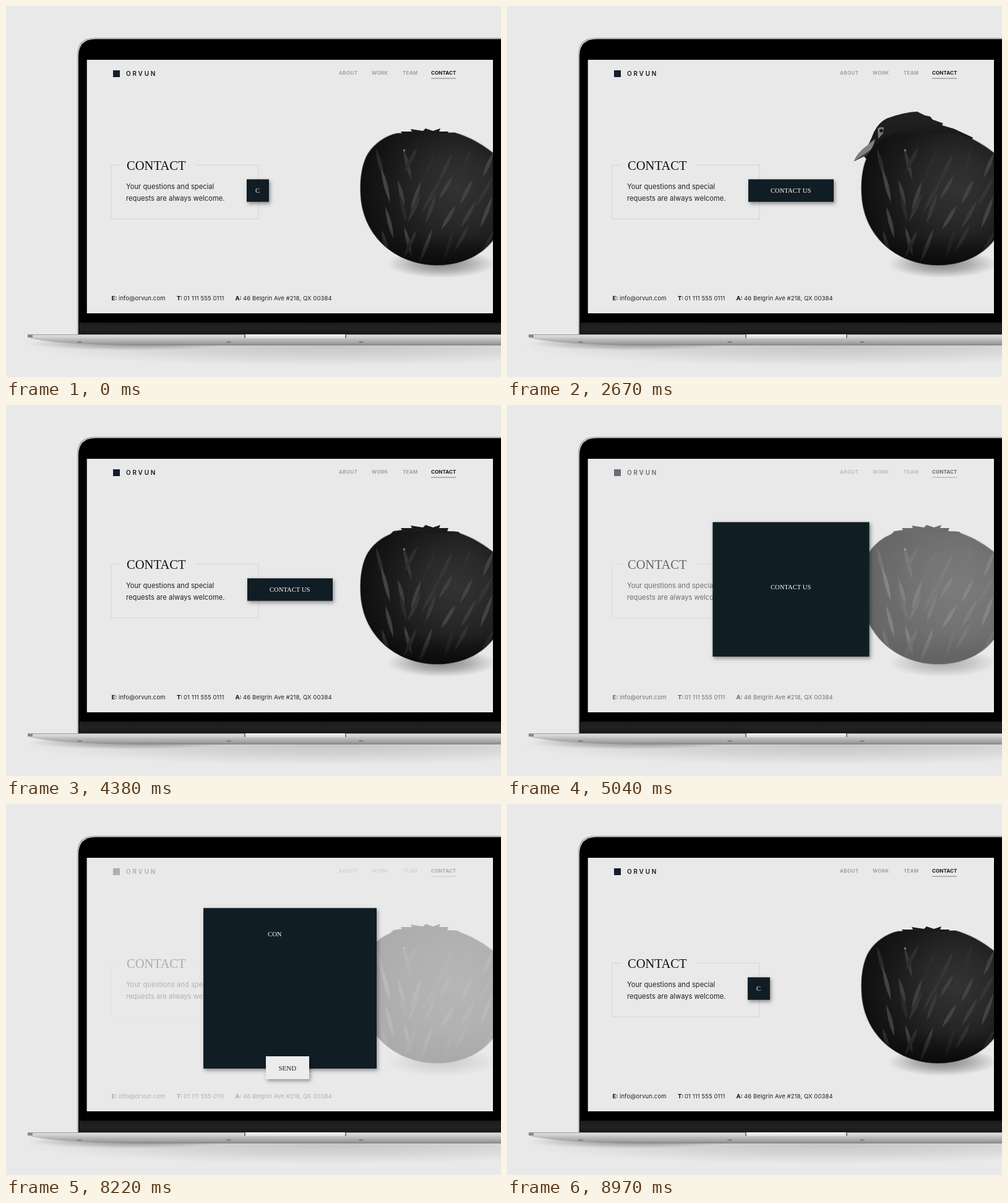
These frames come from a looping animation (800x600 px, 9000 ms). An HTML page with a canvas:

```html
<!DOCTYPE html>
<html lang="en">
<head>
<meta charset="utf-8">
<title>Contact form</title>
<style>
html, body { margin: 0; width: 100%; height: 100%; overflow: hidden; background: #e9e9e9; }
canvas { display: block; }
</style>
</head>
<body>
<canvas id="stage" width="800" height="600"></canvas>
<script>
const ctx = document.getElementById('stage').getContext('2d');
const LOOP = 9000;
const PAPER = '#e9e9e9', NAVY = '#111d24', INK = '#15181d';
const SANS = 'Inter, Arial, sans-serif';
const SERIF = '"Liberation Serif", "Times New Roman", serif';
const SCREEN = [130.5, 87, 656.5, 410];

const seg = (t, a, b) => Math.min(1, Math.max(0, (t - a) / (b - a)));
const mix = (a, b, k) => a + (b - a) * k;
const outCubic = p => 1 - (1 - p) ** 3;
const inOut = (p, n) => p < .5 ? (2 * p) ** n / 2 : 1 - (2 - 2 * p) ** n / 2;

function keyed(t, keys) {
  let i = 1;
  while (i < keys.length - 1 && t > keys[i][0]) i++;
  const [a, from] = keys[i - 1], [b, to] = keys[i];
  return mix(from, to, inOut(seg(t, a, b), 1.4));
}

function text(str, x, y, font, color, spacing = 0) {
  ctx.font = font;
  ctx.letterSpacing = spacing + 'px';
  ctx.fillStyle = color;
  ctx.fillText(str, x, y);
}

function rect(x, y, w, h, color) {
  ctx.fillStyle = color;
  ctx.fillRect(x, y, w, h);
}

function path(d, fill, stroke, width = 1) {
  const p = new Path2D(d);
  if (fill) { ctx.fillStyle = fill; ctx.fill(p); }
  if (stroke) { ctx.strokeStyle = stroke; ctx.lineWidth = width; ctx.stroke(p); }
}

function stops(g, colors) {
  colors.forEach((c, i) => g.addColorStop(i / (colors.length - 1), c));
  return g;
}
const gradient = (y0, y1, ...colors) => stops(ctx.createLinearGradient(0, y0, 0, y1), colors);
const glow = (x, y, r, ...colors) => stops(ctx.createRadialGradient(x, y, 0, x, y, r), colors);

function raised(x, y, w, h, color) {
  ctx.save();
  ctx.shadowColor = 'rgba(0,0,0,.38)';
  ctx.shadowBlur = 6;
  ctx.shadowOffsetX = 2;
  ctx.shadowOffsetY = 3;
  rect(x, y, w, h, color);
  ctx.restore();
}

function softEllipse(x, y, rx, ry, alpha) {
  ctx.save();
  ctx.translate(x, y);
  ctx.scale(rx, ry);
  rect(-1, -1, 2, 2, glow(0, 0, 1, `rgba(0,0,0,${alpha})`, `rgba(0,0,0,${alpha * .6})`, 'rgba(0,0,0,0)'));
  ctx.restore();
}

function shell(inset, color) {
  const x = 115 + inset, y = 51.5 + inset;
  path(`M${x} 531V${y + 28}Q${x} ${y} ${x + 28} ${y}H802V531Z`, color);
}

function laptop() {
  rect(0, 0, 800, 600, PAPER);
  softEllipse(520, 550, 500, 32, .15);
  softEllipse(200, 546, 165, 11, .3);
  shell(0, '#a4a4a4');
  shell(1, '#d2d2d2');
  shell(2, '#000');
  rect(118, 512, 682, 19, gradient(512, 531, '#1b1b1b', '#222', '#181818'));
  path('M35 531H800V549H230Q110 548 60 541Q38 538 35 536Z',
    gradient(531, 549, '#e2e2e2', '#d2d2d2', '#b8b8b8', '#a5a5a5', '#858585'));
  path('M35 531.5H800', null, '#9a9a9a');
  rect(35, 532, 8, 4, 'rgba(60,60,60,.5)');
  rect(386, 531, 164, 6, gradient(531, 537, '#f2f2f2', '#dedede'));
  rect(385, 531, 2, 6, '#777');
  rect(548, 531, 2, 6, '#777');
  for (const x of [119, 360, 574]) {
    ctx.beginPath();
    ctx.ellipse(x, 543.5, 4, 1, 0, 0, 7);
    ctx.fillStyle = '#777';
    ctx.fill();
  }
}

const BODY = 'M573 300C572 275 577 252 585 239C596 222 613 210 632 206L725 205C750 212 777 227 802 251V352C785 396 745 419 695 419C630 418 574 372 573 300Z';
const TUFT = 'M614 220L626 208L640 206L638 203L656 203L654 199L674 202L678 198L690 202L702 198L700 203L715 203L713 208L731 209L745 222Z';
const HEAD = 'M574 240Q584 224 592 203Q600 187 613 181Q640 171 662 170L674 176L683 178L687 183L704 189L702 192L722 198L752 212L720 270H600Z';

let seed = 11;
const rand = () => (seed = seed * 16807 % 2147483647) / 2147483647;
const feathers = Array.from({ length: 28 }, (_, i) => {
  const x = 598 + (i % 7) * 30 + rand() * 16;
  const y = 220 + Math.floor(i / 7) * 40 + rand() * 24;
  return { x, y, len: 44 + rand() * 22, lean: x < 650 ? -.25 : .3 + rand() * .25, tone: 42 + rand() * 26 };
});

function bird(up) {
  softEllipse(704, 417, 88, 23, .42);

  ctx.save();
  ctx.translate((1 - up) * 45, (1 - up) * 35);
  path(HEAD, gradient(170, 260, '#222', '#191919', '#101010'));
  path('M559 251Q565 236 582 224L594 214Q592 229 579 241Q568 246 559 251Z', '#808080');
  path('M559 251Q575 240 588 231L579 241Z', '#3a3a3a');
  path('M598 198Q602 193 608 196L607 205L599 214Z', '#777');
  ctx.beginPath();
  ctx.arc(604, 201, 2.8, 0, 7);
  ctx.fillStyle = '#161616';
  ctx.fill();
  ctx.restore();

  ctx.save();
  ctx.translate(0, -4 * Math.min(1, up / .14));
  path(TUFT, '#1b1b1b');
  ctx.restore();

  path(BODY, glow(728, 295, 165, '#333', '#292929', '#191919', '#0d0d0d'), 'rgba(20,20,20,.35)', 2);
  ctx.save();
  ctx.clip(new Path2D(BODY));
  for (const f of feathers) {
    ctx.save();
    ctx.translate(f.x, f.y);
    ctx.rotate(f.lean);
    path(`M0 0Q7 ${f.len * .5} 0 ${f.len}Q-6 ${f.len * .5} 0 0Z`, `rgb(${f.tone},${f.tone},${f.tone})`);
    ctx.restore();
  }
  rect(570, 370, 230, 50, gradient(370, 420, 'rgba(8,8,8,0)', 'rgba(8,8,8,.85)'));
  ctx.restore();
  rect(642, 232, 3, 3, '#777');
}

function page(up) {
  rect(...SCREEN, PAPER);
  rect(173, 104, 11, 11, '#141d2b');
  text('ORVUN', 194, 112.5, `600 10px ${SANS}`, INK, 2.8);

  const nav = `600 8px ${SANS}`;
  text('ABOUT', 538, 111, nav, '#999', .4);
  text('WORK', 591, 111, nav, '#999', .4);
  text('TEAM', 641, 111, nav, '#999', .3);
  text('CONTACT', 687, 111, `700 8px ${SANS}`, INK, .1);
  rect(687, 116.5, 40, 1.2, '#8d8d8d');

  path('M185 257.5H169.5V344.5H408V257.5H306', null, '#d4d4d4');
  text('CONTACT', 195, 264.5, `20.6px ${SERIF}`, '#111');
  text('Your questions and special', 194, 296, `11.2px ${SANS}`, '#222');
  text('requests are always welcome.', 194, 315, `11.2px ${SANS}`, '#222');

  const details = [
    ['E:', 170.5, 'info@orvun.com', 182],
    ['T:', 276, '01 111 555 0111', 287],
    ['A:', 370.5, '46 Belgrin Ave #218, QX 00384', 383]
  ];
  for (const [label, lx, value, vx] of details) {
    text(label, lx, 475.5, `700 9.5px ${SANS}`, '#111');
    text(value, vx, 475.5, `9.5px ${SANS}`, '#222', .1);
  }
  bird(up);
}

function form(t) {
  const grow = inOut(seg(t, 1950, 2600), 3);
  const open = outCubic(seg(t, 4700, 5500));
  const close = inOut(seg(t, 8220, 8860), 3);
  const x = mix(mix(mix(389, 390, grow), 319, open), 389, close);
  const y = mix(mix(280.3, 168.3, open), 280.3, close);
  const w = mix(mix(mix(36, 138, grow), 280, open), 36, close);
  const h = mix(mix(36.4, 259.6, open), 36.4, close);
  raised(x, y, w, h, NAVY);

  const back = inOut(seg(t, 8020, 8820), 2);
  const tx = mix(mix(403, 426, grow), 403, back);
  const ty = mix(mix(301.5, 201.7, inOut(seg(t, 4900, 5560), 3)), 301.5, back);
  const typed = 1 + Math.floor(9 * seg(t, 2150, 2550));
  const left = Math.max(1, Math.ceil(10 - Math.max(0, t - 7950) * .026));
  text('CONTACT US'.slice(0, Math.min(typed, left)), tx, ty, `10.6px ${SERIF}`, '#fff');

  ['NAME', 'EMAIL', 'TEXT'].forEach((label, i) => {
    const show = seg(t, 5230 + i * 60, 5430 + i * 60) * (1 - seg(t, 7560 + i * 60, 7800 + i * 60));
    if (!show) return;
    ctx.globalAlpha = show;
    const base = 250 + i * 47.3;
    text(label, 349, base, `700 7.5px ${SERIF}`, '#d5d8da', .6);
    rect(349, Math.round(base + 5), 220 * show, 1, '#2b373e');
  });

  ctx.globalAlpha = seg(t, 5380, 5570) * (1 - seg(t, 7560, 7760));
  path('M570.5 191.5L580.5 201.5M580.5 191.5L570.5 201.5', null, '#fff', 2.2);
  ctx.globalAlpha = 1;

  const send = outCubic(seg(t, 5610, 6000)) * (1 - seg(t, 8235, 8400));
  if (send) {
    ctx.save();
    ctx.translate(455, 426.5);
    ctx.scale(send, send);
    raised(-35, -18.5, 70, 37, '#ececec');
    text('SEND', -14.5, 4, `11px ${SERIF}`, '#1b2329');
    ctx.restore();
  }
}

const HEAD_KEYS = [
  [0, 0], [930, .18], [1850, .93], [2300, 1], [3000, .96], [3720, .6], [4380, .14],
  [5040, .14], [6000, .9], [6270, .94], [7000, .97], [7500, .9], [8220, .14], [9000, 0]
];

function draw(now) {
  const t = now % LOOP;
  laptop();
  ctx.save();
  ctx.beginPath();
  ctx.rect(...SCREEN);
  ctx.clip();
  page(keyed(t, HEAD_KEYS));
  ctx.globalAlpha = .93 * seg(t, 4700, 5500) * (1 - seg(t, 8050, 8800));
  rect(...SCREEN, PAPER);
  ctx.globalAlpha = 1;
  form(t);
  ctx.restore();
}

const start = performance.now();
function tick() {
  draw(performance.now() - start);
  requestAnimationFrame(tick);
}
tick();
</script>
</body>
</html>
```
